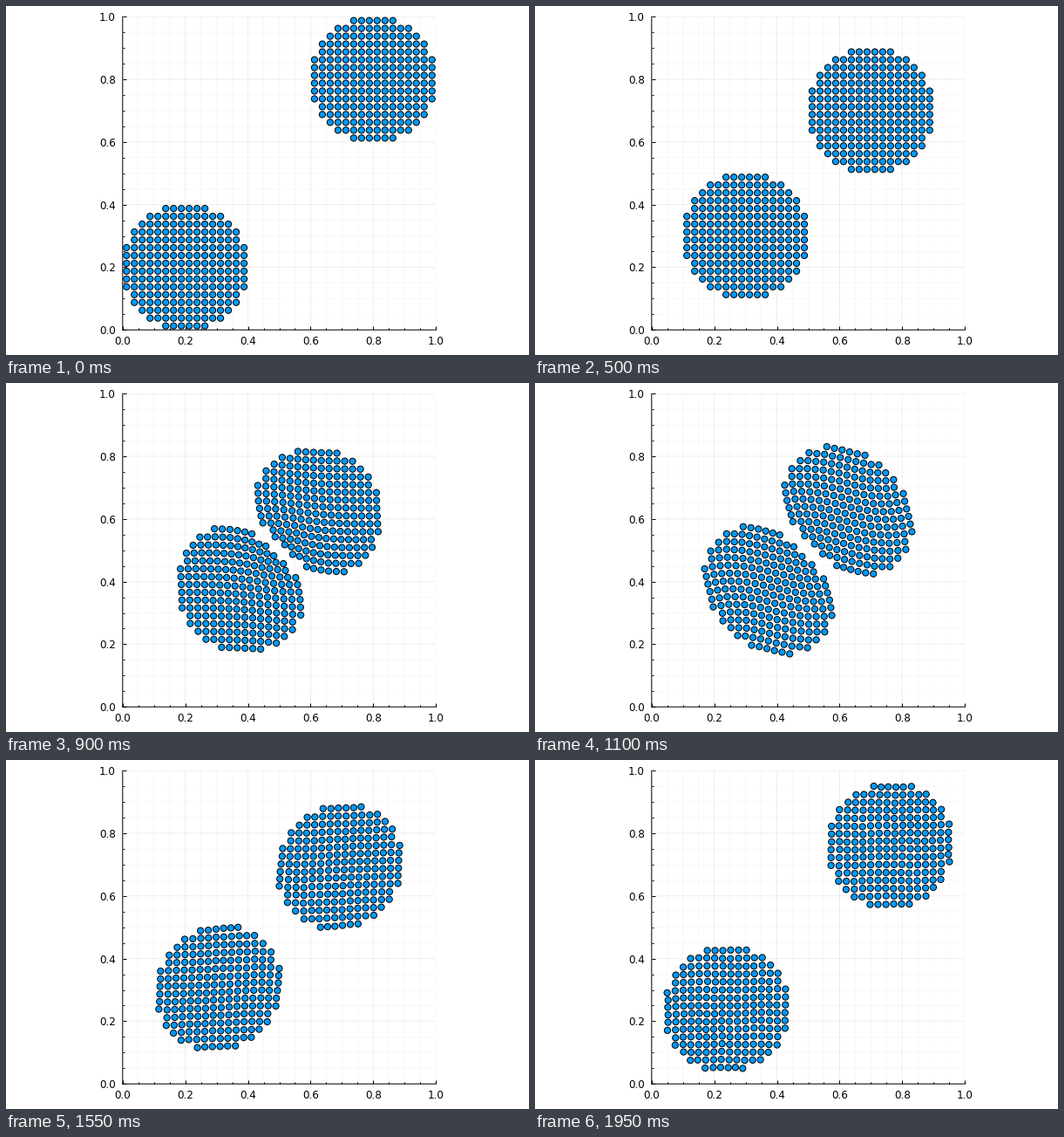
A matplotlib script that plays this animation: 600 by 400 pixels, repeating every 2 s.

```python
"""Two elastic disks collide: explicit material point method on a 20 x 20 grid."""
import numpy as np
import matplotlib.pyplot as plt
from matplotlib.animation import FuncAnimation
from matplotlib.ticker import MultipleLocator

W, H, DPI = 600, 400, 100
FRAMES, INTERVAL, SUBSTEPS = 40, 50, 100
LEFT, RIGHT, TOP, BOTTOM = 133.8, 493.2, 12.2, 371.2

# Material, grid and time step
E, NU, RHO = 1000.0, 0.3, 1000.0
CELLS, DT = 20, 1e-3
SPACING, RADIUS, SPEED = 0.025, 0.2, 0.1
CELL = 1 / CELLS
ROW = CELLS + 1
STIFF = E / (1 + NU) / (1 - 2 * NU)
MASS = RHO * SPACING ** 2


def pt(px):
    return px * 72 / DPI


def disk(center):
    r = np.arange(-7.5, 8) * SPACING
    x, y = (a.ravel() for a in np.meshgrid(r, r))
    inside = x ** 2 + y ** 2 < RADIUS ** 2
    return center + np.array([x[inside], y[inside]])


def shape(pos):
    """Node indices, bilinear weights and their gradients, each (4, n)."""
    cell = np.floor(pos / CELL).astype(int)
    fx, fy = pos / CELL - cell
    gx, gy = 1 - fx, 1 - fy
    base = cell[1] * ROW + cell[0]
    nodes = np.array([base, base + 1, base + ROW, base + ROW + 1])
    weight = np.array([gx * gy, fx * gy, gx * fy, fx * fy])
    dx = np.array([-gy, gy, -fy, fy]) / CELL
    dy = np.array([-gx, -fx, gx, fx]) / CELL
    return nodes, weight, dx, dy


def to_grid(nodes, values):
    return np.bincount(nodes.ravel(), values.ravel(), minlength=ROW * ROW)


def step(pos, vel, stress, vol):
    nodes, weight, dx, dy = shape(pos)
    sxx, syy, sxy = stress

    mass = to_grid(nodes, weight * MASS)
    inv = np.where(mass > 1e-8, 1 / np.maximum(mass, 1e-8), 0)
    force = (-to_grid(nodes, vol * (dx * sxx + dy * sxy)),
             -to_grid(nodes, vol * (dx * sxy + dy * syy)))

    grid_vel = []
    for k in range(2):
        mom = to_grid(nodes, weight * (MASS * vel[k])) + DT * force[k]
        pos[k] += DT * (weight * (mom * inv)[nodes]).sum(0)
        vel[k] += DT * (weight * (force[k] * inv)[nodes]).sum(0)
        # Map the new velocities back before taking the strain
        back = to_grid(nodes, weight * (MASS * vel[k])) * inv
        grid_vel.append(back[nodes])

    u, v = grid_vel
    exx, eyy = DT * (dx * u).sum(0), DT * (dy * v).sum(0)
    uy, vx = DT * (dy * u).sum(0), DT * (dx * v).sum(0)
    exy = (uy + vx) / 2
    vol *= (1 + exx) * (1 + eyy) - uy * vx
    stress[0] += STIFF * ((1 - NU) * exx + NU * eyy)
    stress[1] += STIFF * ((1 - NU) * eyy + NU * exx)
    stress[2] += STIFF * (0.5 - NU) * exy


def simulate():
    a, b = disk(0.2), disk(0.8)
    pos = np.hstack([a, b])
    vel = np.hstack([np.full_like(a, SPEED), np.full_like(b, -SPEED)])
    stress = np.zeros((3, pos.shape[1]))
    vol = np.full(pos.shape[1], SPACING ** 2)
    history = [pos.T.copy()]
    for _ in range(FRAMES - 1):
        for _ in range(SUBSTEPS):
            step(pos, vel, stress, vol)
        history.append(pos.T.copy())
    return history


history = simulate()

plt.rcParams["path.snap"] = False
fig = plt.figure(figsize=(W / DPI, H / DPI), dpi=DPI, facecolor="white")
ax = fig.add_axes([LEFT / W, 1 - BOTTOM / H,
                   (RIGHT - LEFT) / W, (BOTTOM - TOP) / H])
ax.set(xlim=(0, 1), ylim=(0, 1))
ax.set_axisbelow(True)
ax.spines[["top", "right"]].set_visible(False)
for side in ("left", "bottom"):
    ax.spines[side].set(linewidth=pt(1), zorder=0.9)

for axis, pad in ((ax.xaxis, 7), (ax.yaxis, 8)):
    axis.set_major_locator(MultipleLocator(0.2))
    axis.set_minor_locator(MultipleLocator(0.05))
    axis.set_major_formatter("{x:.1f}")
    axis.set_tick_params(which="major", length=pt(4.3), pad=pt(pad),
                         labelsize=pt(12))
ax.tick_params(which="both", direction="in", width=pt(1))
ax.tick_params(which="minor", length=pt(2.2))
ax.grid(which="major", color="black", alpha=0.065, linewidth=pt(1))
ax.grid(which="minor", color="black", alpha=0.03, linewidth=pt(1))

# Per-point sizes keep the markers at sub-pixel positions
sizes = np.full(len(history[0]), pt(7.2) ** 2)
dots = ax.scatter(*history[0].T, s=sizes, c="#009afa", edgecolors="black",
                  linewidths=pt(1), zorder=3)


def draw(i):
    dots.set_offsets(history[i])
    return (dots,)


anim = FuncAnimation(fig, draw, frames=FRAMES, interval=INTERVAL, repeat=True)
plt.show()
```
